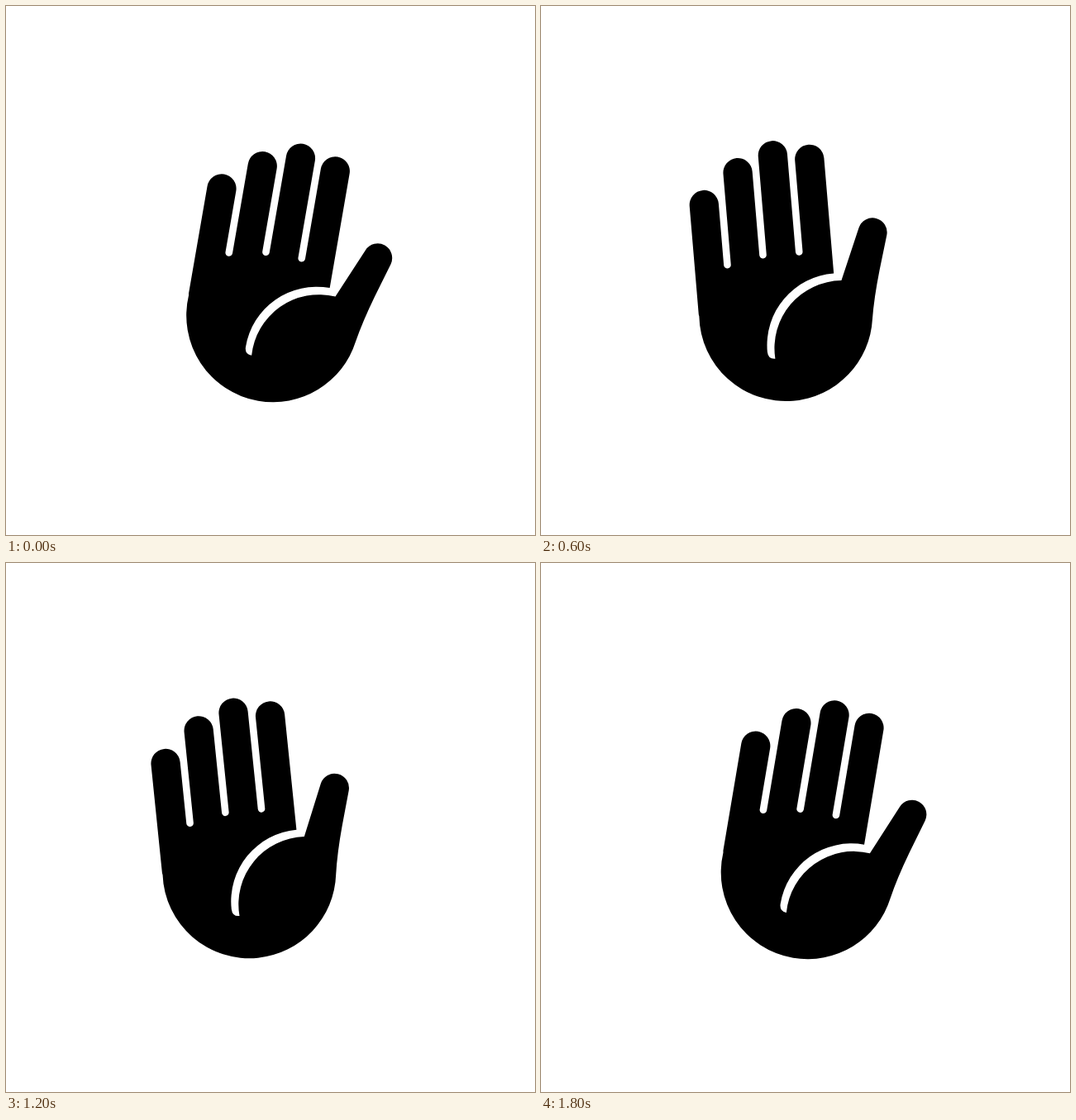
Animation of 640x640 px, one loop 1.9 s. Source, as an HTML page:

```html
<!DOCTYPE html>
<html lang="en">
<head>
<meta charset="utf-8">
<title>Waving hand</title>
<style>
  html, body { margin: 0; width: 100%; height: 100%; overflow: hidden; background: #fff; }
  svg { display: block; width: 100vw; height: 100vh; }
</style>
</head>
<body>
<svg viewBox="0 0 640 640"><path id="hand"/></svg>
<script>
const LOOP = 1900, STEP = 100;
const SWING = 10;            // degrees to either side
const TURN = 916;            // moment the wave reverses, ms
const PIVOT = '305 478';
const FINGER = 35.3, GAP = 8.6;

const hand = document.getElementById('hand');

// Each finger: top of the straight side, then end of the gap to its right
const fingers = [[232.3, 307.2], [197, 298.7], [179.7, 298.7], [188, 0]];

function outline() {
  const r = FINGER / 2, g = GAP / 2;
  let d = 'M200 364';
  for (const [top, gap] of fingers) {
    d += `V${top}a${r} ${r} 0 0 1 ${FINGER} 0`;
    if (gap) d += `V${gap}a${g} ${g} 0 0 0 ${GAP} 0`;
  }
  // Palm crease, thumb, palm
  return d + 'V328.3A87 87 0 0 0 279 416Q279.2 425 287.8 425'
    + 'A82 82 0 0 1 375.5 337.5'
    + 'L401.9 275.7A17.5 17.5 0 0 1 434.8 287.4'
    + 'L422.5 329Q413 362 409 387'
    + 'A105 105 0 0 1 305 477.7A105 105 0 0 1 200.4 366Z';
}

function ease(u) {
  u = Math.min(1, Math.max(0, u));
  return u * u * (3 - 2 * u);
}

function angle(t) {
  const s = t < TURN ? 1 - ease((t + 51) / 976) : ease((t - TURN) / 968);
  return SWING * (2 * s - 1);
}

function draw(now) {
  const t = Math.floor((now % LOOP) / STEP) * STEP;
  hand.setAttribute('transform', `rotate(${angle(t).toFixed(3)} ${PIVOT})`);
}

let start;
function tick(now) {
  if (start === undefined) start = now;
  draw(now - start);
  requestAnimationFrame(tick);
}

hand.setAttribute('d', outline());
draw(0);
requestAnimationFrame(tick);
</script>
</body>
</html>
```
